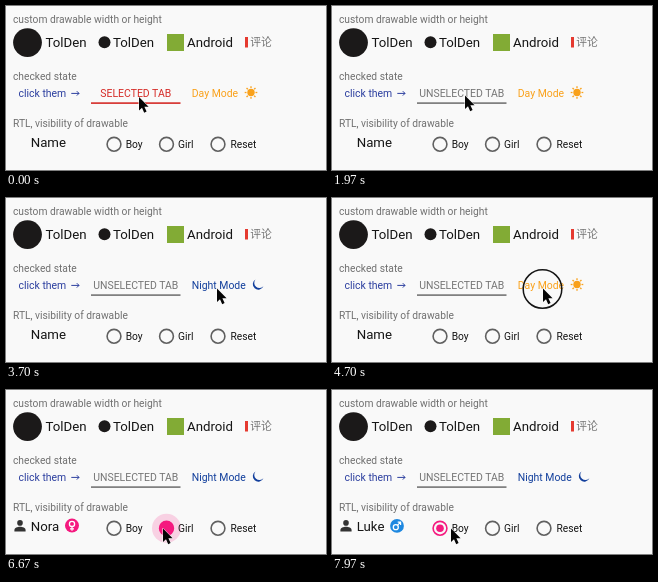
Recreate the animation shown at these times as an HTML page. Size 320 px wide and 164 px high, loop 8000 ms.

```html
<!DOCTYPE html>
<html lang="en">
<head>
<meta charset="utf-8">
<title>Drawable text views</title>
<style>
  html, body { margin: 0; width: 100%; height: 100%; overflow: hidden; background: #f9f9f9; }
  svg { display: block; width: 320px; height: 164px; }
  text { font-family: Roboto, Arial, sans-serif; font-size: 10.45px; }
  .head { font-size: 10.25px; fill: #707070; }
  .big { font-size: 13.25px; fill: #161616; }
  .option { font-size: 10.25px; fill: #161616; }
  .cjk { font-family: "Noto Sans CJK SC", "Noto Sans CJK", sans-serif; font-size: 10.8px; fill: #757575; }
</style>
</head>
<body>
<svg viewBox="0 0 320 164">
  <rect width="320" height="164" fill="#f9f9f9"/>

  <text class="head" x="7" y="16.7">custom drawable width or height</text>
  <circle cx="21.5" cy="36.6" r="14.4" fill="#1b1919"/>
  <text class="big" x="39.5" y="41.4">TolDen</text>
  <circle cx="98.5" cy="36.2" r="6" fill="#1b1919"/>
  <text class="big" x="107" y="41.4">TolDen</text>
  <rect x="161" y="28" width="17" height="17" fill="#82ab35"/>
  <text class="big" x="181" y="41.4">Android</text>
  <rect x="239" y="31" width="3" height="10.5" fill="#e53a30"/>
  <text class="cjk" x="244.3" y="40.4">评论</text>

  <text class="head" x="7" y="74">checked state</text>
  <text x="12.5" y="90.5" fill="#2c3f9f">click them</text>
  <path d="M65.3 87.4H73M70.8 85.2L73 87.4L70.8 89.6" fill="none" stroke="#2c3f9f"/>
  <text id="tab" x="129.8" y="90.5" text-anchor="middle"></text>
  <rect id="line" x="85" y="96.3" width="89.5" height="1.6"/>

  <g id="day" fill="#f9a11b">
    <text x="185.7" y="90.5">Day Mode</text>
    <circle cx="245" cy="86.5" r="3.7"/>
    <g id="rays" stroke="#f9a11b" stroke-width="1.3"></g>
  </g>
  <g id="night" fill="#123f9c">
    <text x="185.7" y="90.5">Night Mode</text>
    <path d="M249.5 81.4A5.5 5.5 0 1 0 257.4 88.2A5.2 5.2 0 0 1 249.5 81.4Z"/>
  </g>

  <text class="head" x="7" y="121">RTL, visibility of drawable</text>
  <g id="person" fill="#333">
    <circle cx="14" cy="132.9" r="2.8"/>
    <path d="M8.4 141.4V140C8.4 137.8 11.5 136.8 14 136.8S19.6 137.8 19.6 140V141.4Z"/>
  </g>
  <text id="name" class="big" x="24.7" y="140.6"></text>
  <g id="female">
    <circle cx="66" cy="135.6" r="7" fill="#f5197f"/>
    <path d="M66 136.6V140.7M64 138.8H68" stroke="#fff" stroke-width="1.2"/>
    <circle cx="66" cy="133.9" r="2.6" fill="none" stroke="#fff" stroke-width="1.3"/>
  </g>
  <g id="male">
    <circle cx="65" cy="135.9" r="6.9" fill="#1e88e0"/>
    <path d="M65.6 135.2L68.4 132.4M65.7 132.2H68.6V135.1" fill="none" stroke="#fff" stroke-width="1.2"/>
    <circle cx="63.8" cy="137.2" r="2.5" fill="none" stroke="#fff" stroke-width="1.3"/>
  </g>
  <g id="radios"></g>

  <circle id="press" r="19.3" fill="none" stroke="#151515" stroke-width="1.5"/>
  <path id="cursor" d="M0 0V13.6L3 10.8L5.2 15.7L7.6 14.6L5.4 9.8H9.6Z"
        fill="#050505" stroke="#fff" stroke-width="1" stroke-linejoin="round" paint-order="stroke"/>
</svg>
<script>
const LOOP = 8000;
const NS = "http://www.w3.org/2000/svg";
const PINK = "#f5197f";
const GREY = "#606060";
const $ = id => document.getElementById(id);

function add(parent, tag, attrs) {
  const el = document.createElementNS(NS, tag);
  set(el, attrs);
  parent.append(el);
  return el;
}

function set(el, attrs) {
  for (const key in attrs) el.setAttribute(key, attrs[key]);
}

const show = (el, on) => el.style.display = on ? "" : "none";
const clamp = x => Math.max(0, Math.min(1, x));
const ease = x => x * x * (3 - 2 * x);
const mix = (a, b, p) => a + (b - a) * p;

for (let i = 0; i < 8; i++) {
  const c = Math.cos(i * Math.PI / 4), s = Math.sin(i * Math.PI / 4);
  add($("rays"), "path", { d: `M${245 + 4.5 * c} ${86.5 + 4.5 * s}L${245 + 6.3 * c} ${86.5 + 6.3 * s}` });
}

const radios = [["Boy", 108, 119.7], ["Girl", 160.5, 172], ["Reset", 212, 224.5]].map(([label, x, textX]) => {
  const at = { cx: x, cy: 138.3 };
  const halo = add($("radios"), "circle", { ...at, fill: PINK });
  const ring = add($("radios"), "circle", { ...at, fill: "none" });
  const dot = add($("radios"), "circle", { ...at, fill: PINK });
  add($("radios"), "text", { x: textX, y: 142, class: "option" }).textContent = label;
  return { label, halo, ring, dot };
});

// time, x, y of the pointer tip
const path = [
  [0, 133, 91], [1000, 133, 91], [1100, 133, 89.5], [2200, 133, 89.5],
  [2850, 207, 91.5], [3100, 207, 91.5], [3370, 211, 90.5], [5470, 211, 90.5],
  [5900, 153, 142], [6030, 153, 142], [6230, 157, 138.5], [6820, 157, 138.5],
  [7170, 119, 138.5], [LOOP, 119, 138.5]
];

// press and release times
const presses = [
  [30, 160], [1000, 1130], [1730, 1860], [3400, 3530],
  [4000, 4130], [4700, 4840], [6370, 6500], [7200, 7430]
];
const tabClicks = [160, 1130, 1860];
const modeClicks = [3530, 4130, 4840];
const GIRL = 6500, BOY = 7430;

function pointerAt(t) {
  const i = path.findIndex(p => p[0] > t);
  const [t0, x0, y0] = path[i - 1], [t1, x1, y1] = path[i];
  const p = ease((t - t0) / (t1 - t0));
  return [mix(x0, x1, p), mix(y0, y1, p)];
}

const toggled = (times, t) => times.filter(x => x <= t).length % 2 === 1;

function drawRadio({ halo, ring, dot }, on, age) {
  const settle = ease(clamp((age - 190) / 150));
  const fade = clamp((age - 150) / 200);
  set(halo, { r: on ? mix(8, 14.5, ease(clamp(age / 150))) : 0, opacity: 0.2 * (1 - fade) });
  set(ring, { r: 6.9, stroke: on ? PINK : GREY, "stroke-width": 1.6 });
  set(dot, { r: !on ? 0 : age < 190 ? mix(2, 7, clamp(age / 120)) : mix(7, 3.8, settle) });
}

function draw(t) {
  const selected = !toggled(tabClicks, t);
  const tint = selected ? "#d52b27" : "#757575";
  $("tab").textContent = selected ? "SELECTED TAB" : "UNSELECTED TAB";
  set($("tab"), { fill: tint });
  set($("line"), { fill: tint });

  const night = toggled(modeClicks, t);
  show($("day"), !night);
  show($("night"), night);

  const choice = t >= BOY ? "Boy" : t >= GIRL ? "Girl" : "";
  $("name").textContent = { Boy: "Luke", Girl: "Nora" }[choice] || "Name";
  show($("person"), choice);
  show($("female"), choice === "Girl");
  show($("male"), choice === "Boy");
  const age = t - (choice === "Boy" ? BOY : GIRL);
  radios.forEach(r => drawRadio(r, r.label === choice, age));

  const [x, y] = pointerAt(t);
  set($("cursor"), { transform: `translate(${x} ${y})` });
  set($("press"), { cx: x - 0.5, cy: y + 0.5 });
  show($("press"), presses.some(([a, b]) => t >= a && t < b));
}

function tick() {
  draw(performance.now() % LOOP);
  requestAnimationFrame(tick);
}
tick();
</script>
</body>
</html>
```
